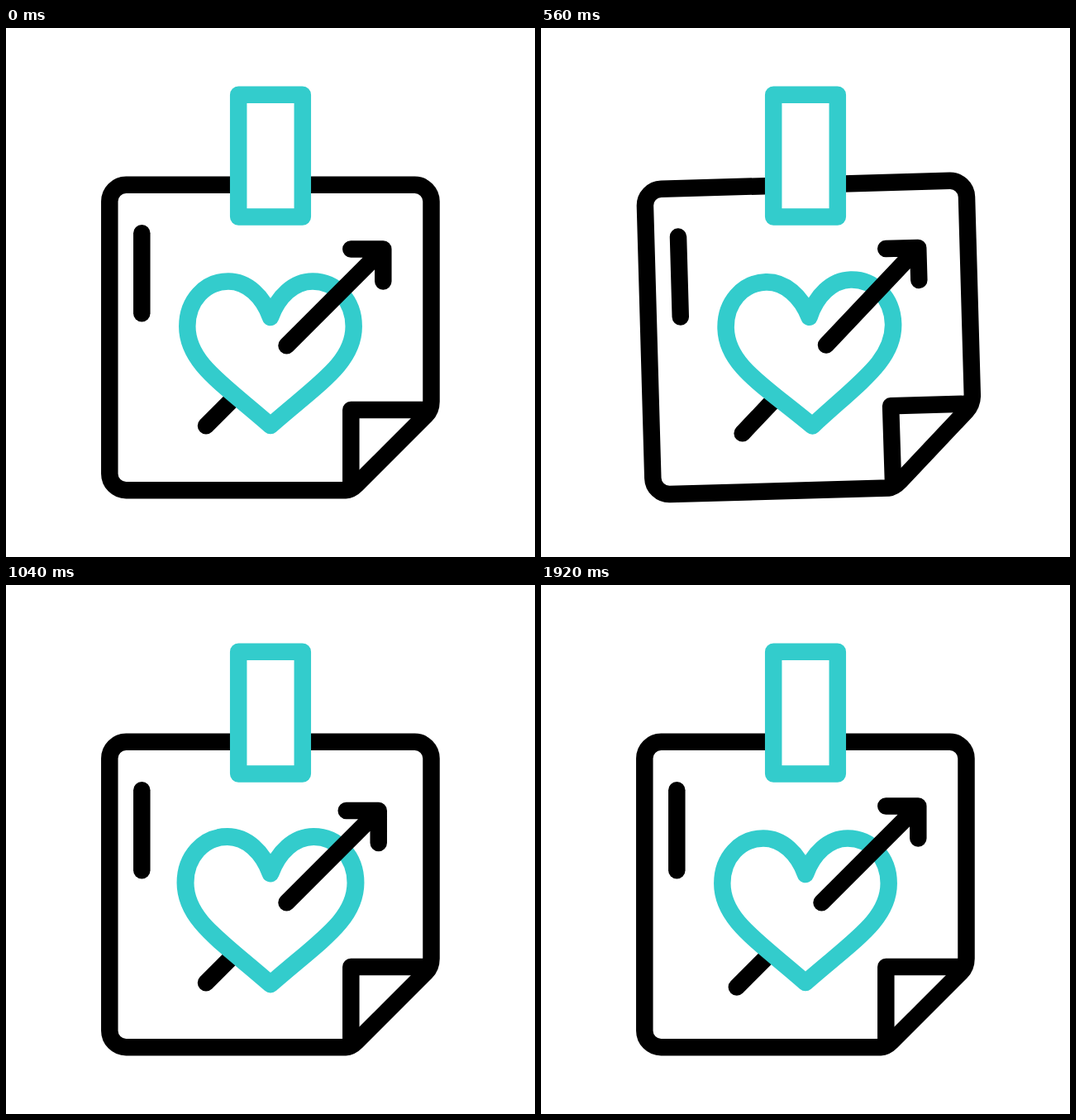
Animation of 640 by 640 pixels, one loop 2000 ms. Source, as an HTML page:

```html
<!DOCTYPE html>
<html lang="en">
<head>
<meta charset="utf-8">
<title>Pinned love note</title>
<style>
  html, body { margin: 0; width: 100%; height: 100%; overflow: hidden; background: #fff; }
  svg { display: block; width: 100vw; height: 100vh; }
  .line { fill: none; stroke: #000; stroke-width: 20.5; stroke-linecap: round; stroke-linejoin: round; }
  .accent { stroke: #3cc; }
  .solid { fill: #fff; }
</style>
</head>
<body>
<svg viewBox="0 0 640 640">
  <g id="note">
    <path id="tail" class="line"/>
    <path id="heart" class="line accent solid"
      d="M320 350C311 325 292 306.5 269 306.5C241 306.5 219.3 330 219.3 361C219.3 405 262 430 320 481C378 430 420.7 405 420.7 361C420.7 330 399 306.5 371 306.5C348 306.5 329 325 320 350Z"/>
    <path id="arrow" class="line"/>
    <path id="paper" class="line"/>
    <path id="fold" class="line"/>
    <path class="line" d="M164.3 248.2V345.2"/>
    <path id="shine" class="line accent"/>
  </g>
  <rect class="line accent solid" x="281.2" y="80.8" width="77.6" height="147.6"/>
</svg>
<script>
const LOOP = 2000, STEP = 40;
const el = id => document.getElementById(id);
const [note, tail, heart, arrow, paper, fold, shine] =
  ['note', 'tail', 'heart', 'arrow', 'paper', 'fold', 'shine'].map(el);
const setPath = (node, d) => node.setAttribute('d', d);

// Eased interpolation through [time, value] keys.
function track(t, keys) {
  if (t <= keys[0][0]) return keys[0][1];
  for (let i = 1; i < keys.length; i++) {
    const [t0, a] = keys[i - 1], [t1, b] = keys[i];
    if (t < t1) {
      const u = (t - t0) / (t1 - t0);
      return a + (b - a) * u * u * (3 - 2 * u);
    }
  }
  return keys[keys.length - 1][1];
}

function drawPaper(curl) {
  const k = curl;
  setPath(paper, `M514.5 ${452 - 14 * k}
    Q${514.5 - 7.6 * k} ${462 - 7 * k} ${508 - 18.6 * k} ${468.5 + 4 * k}
    L${424 + 5.8 * k} ${552.5 - 19.2 * k}
    Q${417.5 - 8.7 * k} ${559 - 4.7 * k} ${411 - 16.3 * k} 559.2
    H145.3a20 20 0 0 1 -20 -20V209.8a20 20 0 0 1 20 -20
    H494.5a20 20 0 0 1 20 20Z`);
  const c = 25 * k;
  setPath(fold, `M511 ${462 - c}L${417.3 - c} ${462 - c}L${417.3 - 0.85 * c} 556`);
}

function drawArrow(pull, tailPull) {
  const x = 456.3 - pull, y = 267.5 + pull;
  setPath(arrow, `M339.5 384.2L${x} ${y}M${x - 39} ${y}H${x}V${y + 39}`);
  setPath(tail, `M277.7 445.5L${242 - tailPull} ${481.2 + tailPull}`);
}

function render(t) {
  const angle = track(t, [[100, 0], [360, 3], [600, -2], [840, 0]]);
  note.setAttribute('transform', `rotate(${angle} 320 190)`);
  drawPaper(track(t, [[100, 0], [360, 1], [600, 0]]));

  const beat = track(t, [[480, 1], [840, 1.045], [1240, 1]]);
  heart.setAttribute('transform', `translate(320 394) scale(${beat}) translate(-320 -394)`);

  drawArrow(
    track(t, [[480, 0], [790, 14], [1230, 0]]),
    track(t, [[100, 0], [360, 4.7], [480, 4.7], [740, 14.3], [1040, 0], [1200, 13.5], [1360, 5.2]])
  );

  const end = track(t, [[1080, 0], [1640, 97]]);
  const start = track(t, [[1360, 0], [1920, 97]]);
  setPath(shine, end > start ? `M164.3 ${345.2 - start}V${345.2 - end}` : '');
}

const origin = performance.now();
function tick() {
  const t = (performance.now() - origin) % LOOP;
  render(Math.floor(t / STEP) * STEP);
  requestAnimationFrame(tick);
}
render(0);
requestAnimationFrame(tick);
</script>
</body>
</html>
```
